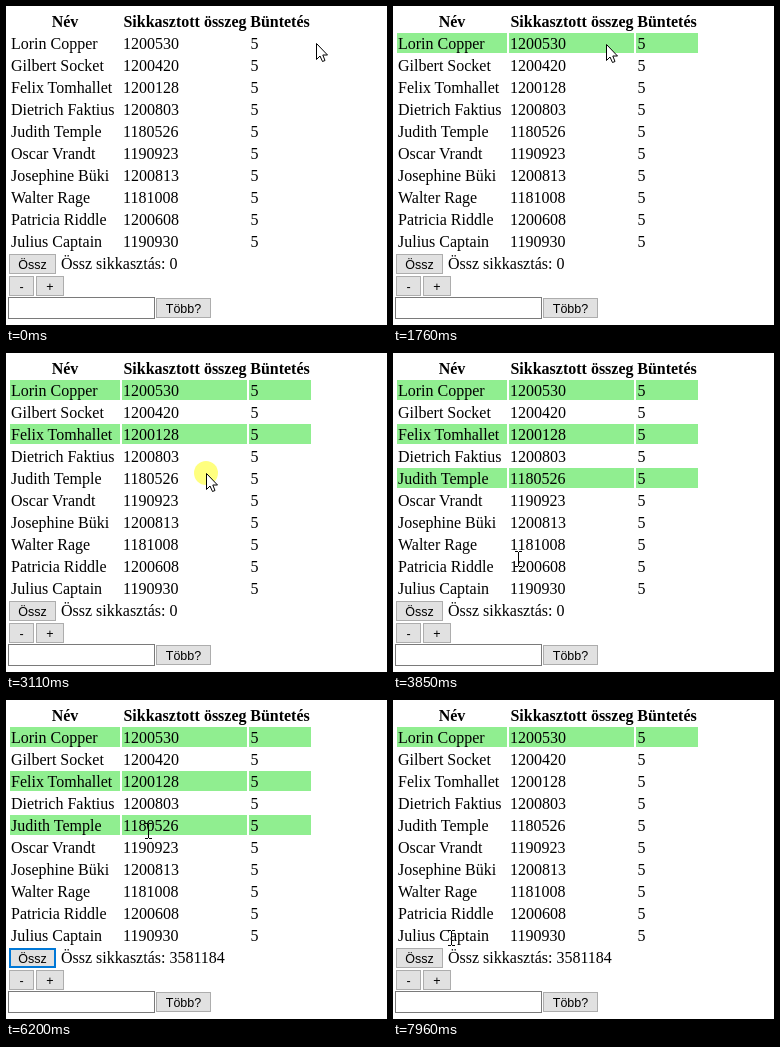
An HTML page for the animation above (8000 ms loop, 381 by 319 pixels).

```html
<!DOCTYPE html>
<html lang="hu">
<head>
<meta charset="utf-8">
<title>Sikkasztások</title>
<style>
  html, body { margin: 0; width: 100%; height: 100%; overflow: hidden; background: #fff; }
  svg { display: block; }
  text { font: 16px "Liberation Serif", serif; white-space: pre; }
  .head { font-weight: bold; text-anchor: middle; }
  .label { font: 12.5px "Liberation Sans", sans-serif; text-anchor: middle; }
</style>
</head>
<body>
<svg id="stage" width="381" height="319" viewBox="0 0 381 319"></svg>
<script>
const LOOP = 8000;
const people = [
  ["Lorin Copper", 1200530], ["Gilbert Socket", 1200420], ["Felix Tomhallet", 1200128],
  ["Dietrich Faktius", 1200803], ["Judith Temple", 1180526], ["Oscar Vrandt", 1190923],
  ["Josephine Büki", 1200813], ["Walter Rage", 1181008], ["Patricia Riddle", 1200608],
  ["Julius Captain", 1190930]
];
const selected = { 0: [1710, LOOP], 2: [2500, 7580], 4: [3190, 6890] };
const clicks = [1630, 2420, 3110, 4670, 6810, 7500];
const SUM_AT = 4770, BLUR_AT = 6810;

const linear = p => p, easeIn = p => p * p, easeOut = p => p * (2 - p);
const smooth = p => p * p * (3 - 2 * p);

// Pointer moves: start, end, x, y, easing
const moves = [
  [559, 560, 309, 37, linear],
  [840, 1450, 213, 37, easeOut],
  [1710, 2190, 209, 76, smooth],
  [2500, 2930, 200, 120, smooth],
  [3190, 3850, 125, 206, easeIn],
  [3850, 3900, 112, 214, linear],
  [3900, 4490, 43, 262, easeOut],
  [5530, 6200, 142, 131, smooth],
  [6890, 7270, 140, 88, smooth],
  [7580, 7960, 58, 238, smooth]
];

const stage = document.getElementById("stage");
function add(tag, attrs, content = "") {
  const el = document.createElementNS("http://www.w3.org/2000/svg", tag);
  set(el, attrs);
  el.textContent = content;
  return stage.appendChild(el);
}
function set(el, attrs) {
  for (const key in attrs) el.setAttribute(key, attrs[key]);
}
const write = (x, y, str, cls = "") => add("text", { x, y, class: cls }, str);
const show = (el, on) => el.setAttribute("visibility", on ? "visible" : "hidden");
const within = (t, [from, to]) => t >= from && t < to;

function button(x, y, w, str) {
  const box = add("rect", { x: x + .5, y: y + .5, width: w - 1, height: 19, fill: "#e1e1e1", stroke: "#adadad" });
  write(x + w / 2, y + 14.5, str, "label");
  return box;
}

const bands = Object.entries(selected).map(([row, span]) => {
  const y = 27 + 22 * row;
  const d = `M4 ${y}h110v20H4zM116 ${y}h125v20H116zM243 ${y}h62v20H243z`;
  return { el: add("path", { d, fill: "#90ee90" }), span };
});

write(59, 21, "Név", "head");
write(179, 21, "Sikkasztott összeg", "head");
write(274, 21, "Büntetés", "head");
const words = people.flatMap(([name, amount], i) => {
  const y = 43 + 22 * i;
  return [write(5, y, name), write(117, y, amount), write(244.5, y, 5)];
});
const total = write(55, 263, "");
words.push(total);

const sumButton = button(3, 248, 47, "Össz");
button(3, 270, 25, "-");
button(30, 270, 28, "+");
add("rect", { x: 2.5, y: 291.5, width: 146, height: 21, fill: "#fff", stroke: "#7a7a7a" });
button(150, 292, 55, "Több?");

const halo = add("circle", { r: 12, fill: "#ff0", "fill-opacity": .5 });
const arrow = add("path", {
  d: "M.5.5V16.5L4 13L6.5 18.5L9 17.5L6.8 12H11.5Z", fill: "#fff", stroke: "#000"
});
const beam = add("path", {
  d: "M-3-7.5H0M1-7.5H4M.5-7V7M-3 7.5H0M1 7.5H4", fill: "none", stroke: "#000"
});

function pointerAt(t) {
  let x = 310, y = 37;
  for (const [from, to, toX, toY, ease] of moves) {
    if (t < from) break;
    const p = ease(Math.min(1, (t - from) / (to - from)));
    x += (toX - x) * p;
    y += (toY - y) * p;
  }
  return [Math.round(x), Math.round(y)];
}

function overText(x, y) {
  return words.some(el => {
    const left = +el.getAttribute("x"), base = +el.getAttribute("y");
    return y >= base - 15 && y < base + 4 && x >= left && x < left + el.getComputedTextLength();
  });
}

function styleSumButton(hover, pressed, focused) {
  const ring = focused && !hover;
  const inset = ring ? 1 : .5;
  set(sumButton, {
    x: 3 + inset, y: 248 + inset, width: 47 - 2 * inset, height: 20 - 2 * inset,
    "stroke-width": 2 * inset,
    fill: pressed ? "#cce4f7" : hover ? "#e5f1fb" : "#e1e1e1",
    stroke: pressed ? "#005499" : hover || ring ? "#0078d7" : "#adadad"
  });
}

function draw(t) {
  const [x, y] = pointerAt(t);
  const pressed = clicks.some(c => within(t, [c, c + 100]));
  const hover = x >= 3 && x < 50 && y >= 248 && y < 268;

  bands.forEach(b => show(b.el, within(t, b.span)));
  total.textContent = "Össz sikkasztás: " + (t < SUM_AT ? 0 : 3581184);
  styleSumButton(hover, hover && pressed, within(t, [SUM_AT, BLUR_AT]));

  const text = overText(x, y);
  for (const el of [halo, arrow, beam]) el.setAttribute("transform", `translate(${x} ${y})`);
  show(halo, pressed);
  show(arrow, !text);
  show(beam, text);
}

const start = performance.now();
function tick() {
  draw((performance.now() - start) % LOOP);
  requestAnimationFrame(tick);
}
tick();
</script>
</body>
</html>
```
